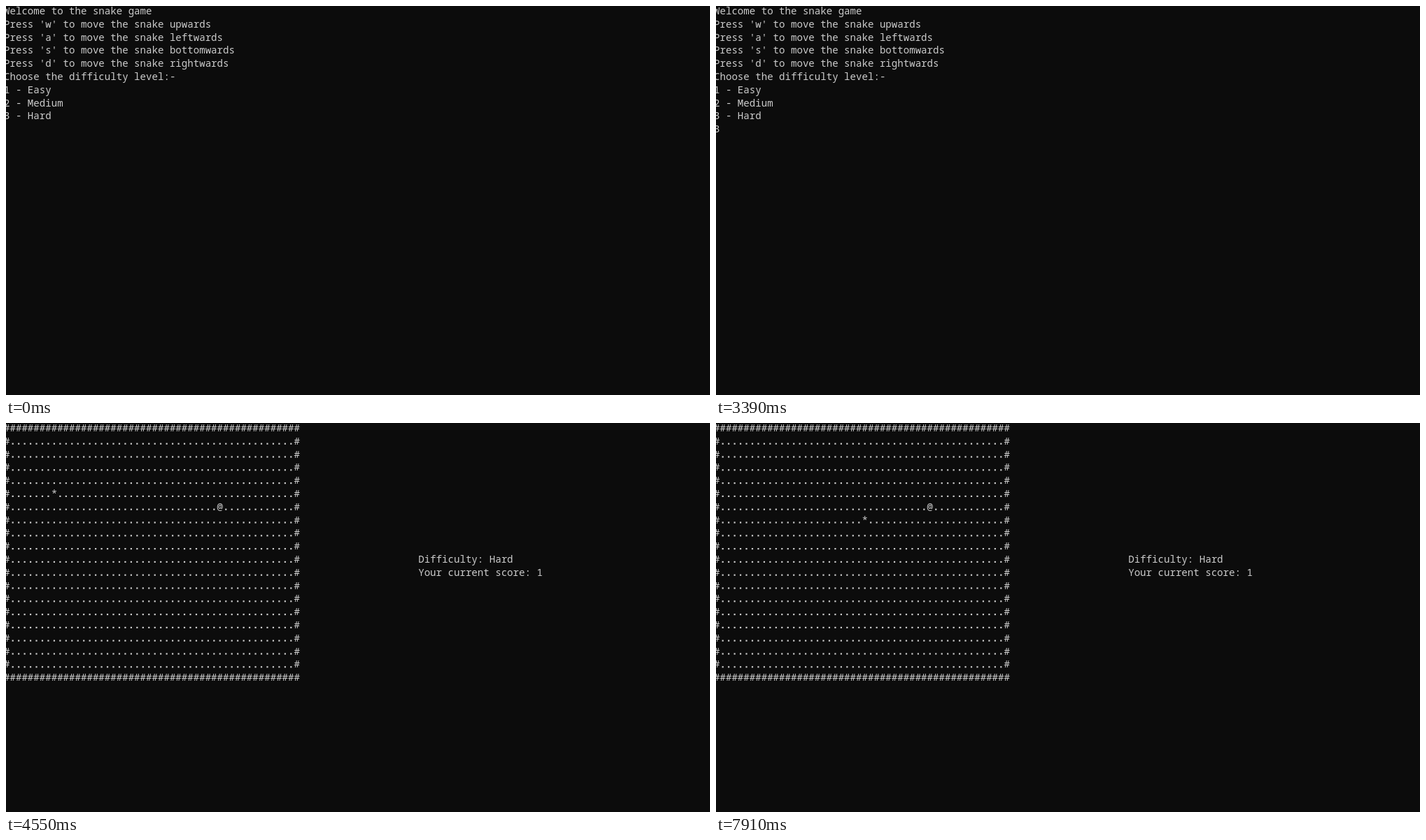
Animation of 1006 by 557 pixels, one loop 8 s. Source, as an HTML page with a canvas:

```html
<!DOCTYPE html>
<html lang="en">
<head>
<meta charset="utf-8">
<title>Terminal snake</title>
<style>
html, body { margin: 0; width: 100%; height: 100%; overflow: hidden; background: #0c0c0c; }
canvas { display: block; }
</style>
</head>
<body>
<canvas id="stage" width="1006" height="557"></canvas>
<script>
const ctx = document.getElementById('stage').getContext('2d');
const LOOP = 8000;
const CELL = 8.46, LINE = 18.8, LEFT = -3, BASELINE = 12, DOT = 2.2;
const BG = '#0c0c0c', FG = '#cccccc';
const COLS = 50, ROWS = 20;
const HEAD = { x: 36, y: 6 };

const MENU = [
  'Welcome to the snake game',
  "Press 'w' to move the snake upwards",
  "Press 'a' to move the snake leftwards",
  "Press 's' to move the snake bottomwards",
  "Press 'd' to move the snake rightwards",
  'Choose the difficulty level:-',
  '1 - Easy',
  '2 - Medium',
  '3 - Hard'
];

function print(text, col, row) {
  ctx.fillStyle = FG;
  const y = BASELINE + row * LINE;
  [...text].forEach((ch, i) => {
    const x = LEFT + (col + i) * CELL;
    if (ch === '.') ctx.fillRect(x + (CELL - DOT) / 2, y - DOT, DOT, DOT);
    else if (ch !== ' ') ctx.fillText(ch, x, y);
  });
}

function caret(col, row) {
  ctx.fillStyle = FG;
  ctx.fillRect(Math.round(LEFT + col * CELL), Math.round(row * LINE + 12), 8, 4);
}

function boardRow(y, star) {
  if (y === 0 || y === ROWS - 1) return '#'.repeat(COLS);
  const cells = [...'#' + '.'.repeat(COLS - 2) + '#'];
  if (y === HEAD.y) cells[HEAD.x] = '@';
  if (star && y === star.y) cells[star.x] = '*';
  return cells.join('');
}

// The star runs right, drops two rows, then runs right again.
function starAt(t) {
  const moves = t < 6430 ? 11 * (t - 4550) / 1880 : 11 + 8 * (t - 6430) / 1480;
  const n = Math.min(19, Math.floor(moves + 1e-6));
  if (n <= 4) return { x: 8 + n, y: 5 };
  if (n <= 6) return { x: 12, y: n + 1 };
  return { x: 6 + n, y: 7 };
}

function pointerAt(t) {
  if (t < 70 || t >= 2140) return null;
  if (t < 1680) {
    const k = Math.min(1, Math.floor((t - 70) / 92) / 5);
    const left = (1 - k) ** 2;
    return { x: 497 + 86 * left, y: 364 + 50 * left };
  }
  const k = (Math.floor((t - 1680) / 76.7) + 1) / 6;
  return { x: 497 + 435 * k, y: 364 + 34 * k };
}

function drawPointer({ x, y }) {
  ctx.beginPath();
  [[0.5, 0.5], [0.5, 14.5], [3.7, 11.6], [6, 17], [8.3, 16], [6, 10.8], [10.5, 10.5]]
    .forEach(([dx, dy]) => ctx.lineTo(x + dx, y + dy));
  ctx.closePath();
  ctx.fillStyle = '#fff';
  ctx.fill();
}

function drawClick() {
  ctx.fillStyle = 'rgba(255,255,0,0.5)';
  ctx.beginPath();
  ctx.arc(497, 363, 14, 0, Math.PI * 2);
  ctx.fill();
}

function drawMenu(t) {
  MENU.forEach((line, row) => print(line, 0, row));
  if (t >= 2310 && t < 2840) caret(0, 9);
  if (t >= 3010) print('3', 0, 9);
  if (t >= 3010 && t < 3390) caret(1, 9);
  const pointer = pointerAt(t);
  if (pointer) drawPointer(pointer);
  if (t >= 1290 && t < 1370) drawClick();
}

function drawPartialBoard() {
  for (let y = 0; y < 6; y++) print(boardRow(y), 0, y);
  print(boardRow(6).slice(0, 40), 0, 6);
  print(MENU[7], 0, 7);
  print(MENU[8], 0, 8);
  print('3', 0, 9);
}

function drawGame(t) {
  const star = starAt(t);
  for (let y = 0; y < ROWS; y++) print(boardRow(y, star), 0, y);
  print('Difficulty: Hard', 70, 10);
  print('Your current score: 1', 70, 11);
}

function draw(t) {
  ctx.fillStyle = BG;
  ctx.fillRect(0, 0, 1006, 557);
  ctx.font = '500 14.1px "Noto Sans Mono", monospace';
  if (t < 3940) drawMenu(t);
  else if (t < 4020) drawPartialBoard();
  else drawGame(t);
}

const start = performance.now();
function tick() {
  draw((performance.now() - start) % LOOP);
  requestAnimationFrame(tick);
}
tick();
</script>
</body>
</html>
```
